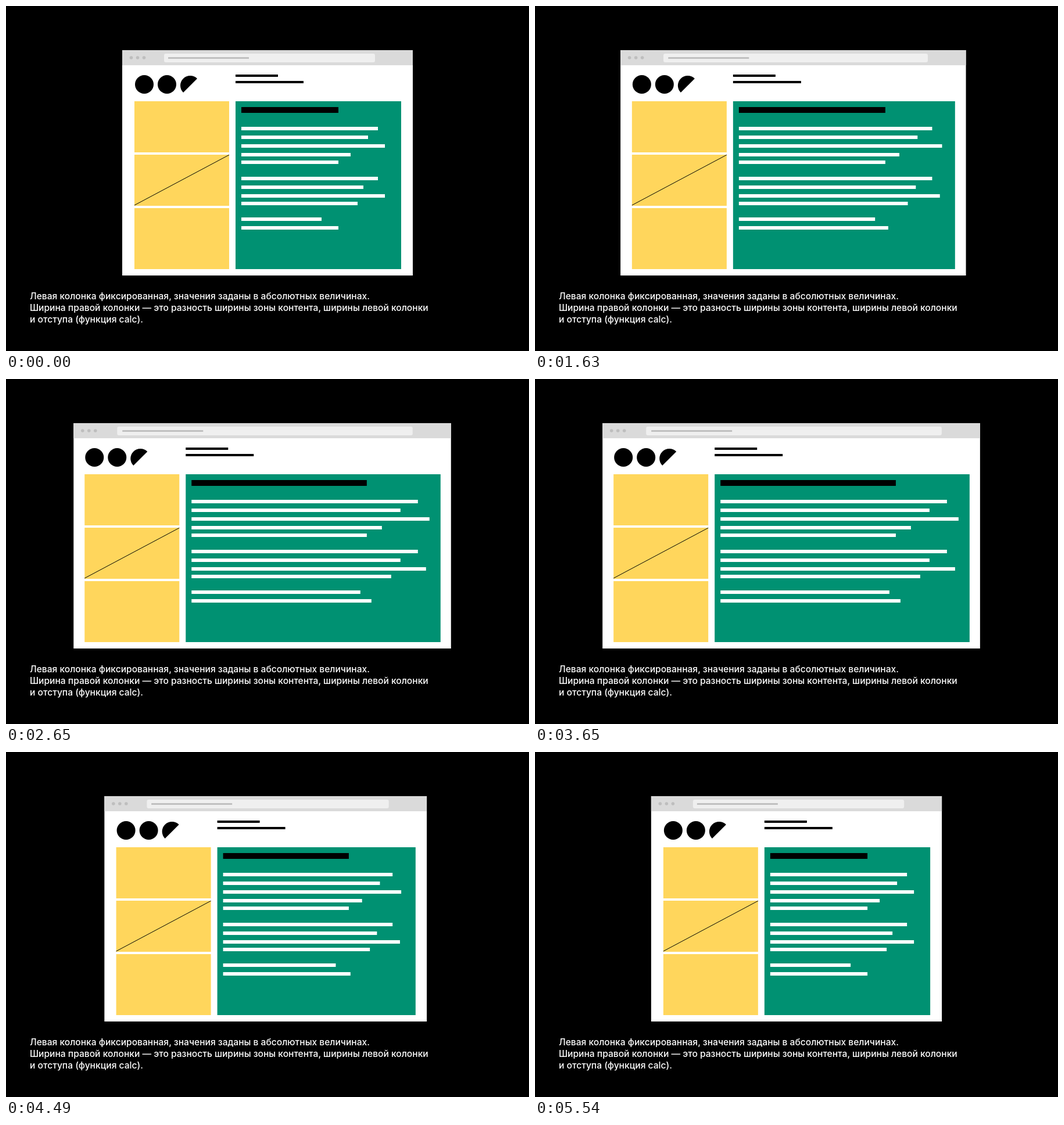
Recreate the animation shown at these times as an HTML page with a canvas. Size 900 px wide and 594 px high, loop 5.57 s.

```html
<!DOCTYPE html>
<html lang="ru">
<head>
<meta charset="utf-8">
<style>
  html, body { margin: 0; width: 100%; height: 100%; overflow: hidden; background: #000; }
  canvas { position: absolute; left: 0; top: 0; }
  p {
    position: absolute; left: 41px; top: 490px; margin: 0;
    font: 500 15.6px/20px Inter, sans-serif; color: #fff; white-space: nowrap;
  }
</style>
</head>
<body>
<canvas width="900" height="594"></canvas>
<p>Левая колонка фиксированная, значения заданы в абсолютных величинах.<br>
Ширина правой колонки — это разность ширины зоны контента, ширины левой колонки<br>
и отступа (функция calc).</p>
<script>
const ctx = document.querySelector('canvas').getContext('2d');
const LOOP = 5570, STEP = 30, DURATION = 60.8;

// Text bars in the right column: top, narrow right edge, wide right edge
const textBars = [
  [208, 640, 709], [223, 623, 679], [238, 652, 729], [253, 593, 647], [266, 572, 621],
  [294, 640, 709], [309, 615, 679], [324, 652, 723], [337, 605, 663],
  [364, 543, 610], [379, 572, 629]
];

// cubic-bezier(.25, .1, .25, 1)
function ease(x) {
  if (x <= 0) return 0;
  if (x >= 1) return 1;
  const bezier = (a, b, s) => 3 * a * s * (1 - s) ** 2 + 3 * b * s * s * (1 - s) + s ** 3;
  let low = 0, high = 1;
  for (let i = 0; i < 30; i++) {
    const mid = (low + high) / 2;
    if (bezier(.25, .25, mid) < x) low = mid; else high = mid;
  }
  return bezier(.1, 1, low);
}

// 0 = narrow window, 1 = wide window; both end poses rest for a second
function widthAt(t) {
  if (t < 1000) return 0;
  const step = t < 3650
    ? Math.min(55, Math.floor((t - 1000) / STEP))
    : 56 + Math.floor((t - 3650) / STEP);
  return ease((step + 1.2) / DURATION) - ease((step - 61.6) / DURATION);
}

function rect(color, left, top, right, bottom) {
  ctx.fillStyle = color;
  ctx.fillRect(left, top, right - left, bottom - top);
}

function disc(color, x, y, r, from = 0, to = 2 * Math.PI) {
  ctx.fillStyle = color;
  ctx.beginPath();
  ctx.arc(x, y, r, from, to);
  ctx.fill();
}

function draw(p) {
  const mix = (a, b) => a + (b - a) * p;
  const frameLeft = mix(200, 116), frameRight = mix(700, 766);
  ctx.clearRect(0, 0, 900, 594);

  // Browser window
  rect('#fff', frameLeft, 76, frameRight, 464);
  rect('#dadada', frameLeft, 76, frameRight, 102);
  for (const x of [15.5, 26.5, 37.5]) disc('#bebebe', frameLeft + x, 89, 2.8);
  const fieldLeft = mix(272, 191);
  ctx.fillStyle = '#efefef';
  ctx.beginPath();
  ctx.roundRect(fieldLeft, 82, mix(635, 700) - fieldLeft, 15, 3);
  ctx.fill();
  rect('#c0c0c0', mix(279, 200), 88, mix(418, 339), 91);

  // Header and fixed left column
  const left = mix(221, 135), main = left + 174;
  disc('#000', left + 17, 135, 16);
  disc('#000', left + 56, 135, 16);
  disc('#000', left + 96, 137, 17, Math.PI * .75, Math.PI * 1.75);
  rect('#000', main, 118, main + 73, 122);
  rect('#000', main, 129, main + 117, 133);
  for (const [top, bottom] of [[164, 252], [256, 344], [348, 453]])
    rect('#ffd65c', left, top, left + 163, bottom);
  ctx.strokeStyle = '#000';
  ctx.lineWidth = 1;
  ctx.beginPath();
  ctx.moveTo(left, 343);
  ctx.lineTo(left + 163, 256.3);
  ctx.stroke();

  // Fluid right column
  rect('#009172', main, 164, mix(680, 748), 453);
  rect('#000', main + 10, 174, mix(572, 621), 184);
  for (const [top, narrow, wide] of textBars)
    rect('#fff', main + 10, top, mix(narrow, wide), top + 6);
}

function tick() {
  draw(widthAt(performance.now() % LOOP));
  requestAnimationFrame(tick);
}
tick();
</script>
</body>
</html>
```
